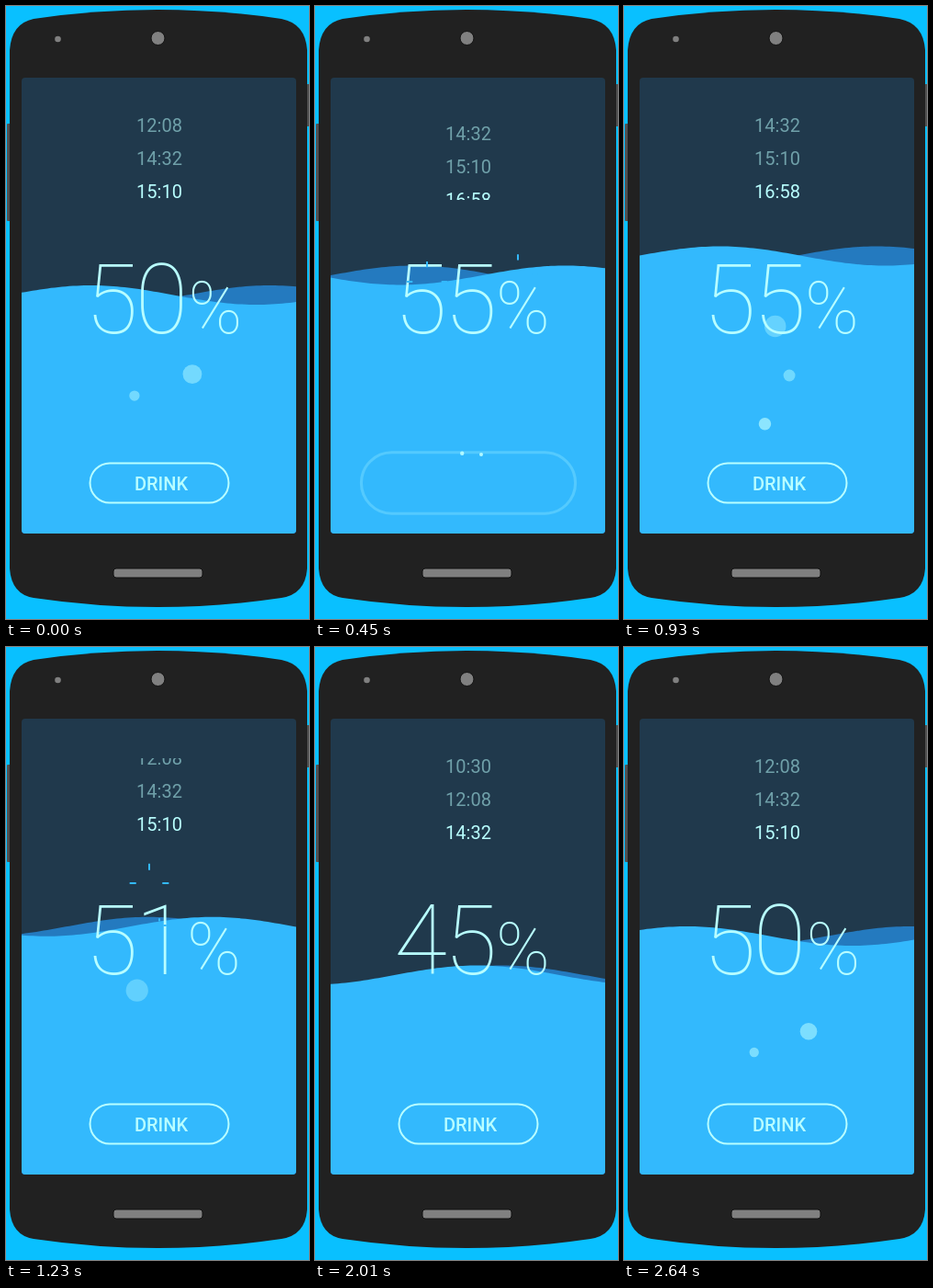
These frames come from a looping animation (330 by 667 pixels, 2670 ms). An HTML page:

```html
<!DOCTYPE html>
<html lang="en">
<head>
<meta charset="utf-8">
<title>Water tracker</title>
<style>
  html, body { margin: 0; width: 100%; height: 100%; overflow: hidden; background: #09c0ff; }
  svg { display: block; width: 330px; height: 667px; font-family: Roboto, sans-serif; }
  text { fill: #b8ffff; text-anchor: middle; }
  #times { font-size: 20px; }
  #number { font-size: 105px; font-weight: 100; }
  #number .unit { font-size: 79px; }
  #button { font-size: 20px; font-weight: 500; }
  #button rect { fill: none; stroke: #b8ffff; stroke-width: 2; }
  #rays path { fill: none; stroke: #33b9fd; stroke-width: 2; }
</style>
</head>
<body>
<svg viewBox="0 0 330 667">
  <defs>
    <clipPath id="screen"><rect x="17" y="78" width="299" height="496" rx="4"/></clipPath>
    <clipPath id="window"><rect x="17" y="121" width="299" height="90"/></clipPath>
  </defs>

  <g fill="#505050">
    <rect x="1" y="128" width="6" height="106" rx="1"/>
    <rect x="325" y="85" width="6" height="46" rx="1"/>
  </g>
  <path fill="#212121" d="M4 48Q6 19 30 14Q165-6 300 14Q326 19 328 48V612Q326 640 300 644Q165 664 30 644Q6 640 4 612Z"/>
  <g fill="#808080">
    <circle cx="56.5" cy="36" r="3.3"/>
    <circle cx="165.5" cy="35" r="7.5" stroke="#111" stroke-width="1"/>
    <rect x="117" y="612" width="97" height="10" rx="3" stroke="#111" stroke-width="1"/>
  </g>

  <g clip-path="url(#screen)">
    <rect x="17" y="78" width="299" height="496" fill="#20394c"/>
    <path id="back" fill="#247abf"/>
    <path id="front" fill="#33b9fd"/>
    <g id="bubbles" fill="#b0f8ff"></g>
    <g id="times" clip-path="url(#window)"></g>
    <g id="number">
      <text id="tens" x="115" y="356"></text>
      <text id="ones" x="169.5" y="356"></text>
      <text id="unit" class="unit" y="356">%</text>
    </g>
    <g id="rays"></g>
    <g id="button">
      <rect id="ring" x="-75.5" y="-21.5" width="151" height="43" rx="21.5"/>
      <text id="label" x="169" y="526.5">DRINK</text>
    </g>
  </g>
</svg>
<script>
const LOOP = 2670, CYCLE = 2700;
const CLICKS = [240, 2040];
const TIMES = ['10:30', '12:08', '14:32', '15:10', '16:58'];
const BUBBLES = [
  // start, end, x, linear drift, late drift, y from, y to, power, size
  [440, 1095, 160, 13.7, -17.7, 487, 257, 1.76, 15],
  [450, 1205, 181, 2.9, -16.9, 488, 303, 1.7, 9],
  [668, 1390, 154, 0, -30.5, 488, 317, 1.62, 15],
  [2250, 3000, 193, 13.3, 14.7, 487, 292, 1.6, 16],
  [2250, 2995, 149, -11.6, -15.4, 488, 300, 2.15, 8]
];
const SPLASH = 260, REACH = 22.5;

const $ = id => document.getElementById(id);
const clamp = v => Math.min(1, Math.max(0, v));
const span = (t, start, length) => clamp((t - start) / length);
const inOut = u => u < .5 ? 4 * u ** 3 : 1 - 4 * (1 - u) ** 3;
const outQuad = u => 1 - (1 - u) ** 2;
const outCubic = u => 1 - (1 - u) ** 3;

function add(parent, tag, text = '') {
  const el = document.createElementNS('http://www.w3.org/2000/svg', tag);
  el.textContent = text;
  return $(parent).appendChild(el);
}
function set(el, attrs) {
  for (const name in attrs) el.setAttribute(name, attrs[name]);
}

const items = TIMES.map(time => add('times', 'text', time));
const dots = BUBBLES.map(() => add('bubbles', 'circle'));
const rays = BUBBLES.map(() => add('rays', 'path'));
items.forEach(el => set(el, { x: 167 }));

function wave(level, crest) {
  let d = 'M17 574';
  for (let x = 17; x <= 317; x += 4) {
    const y = level - 10.5 * Math.cos((x - crest) * Math.PI / 180);
    d += `L${x} ${y.toFixed(2)}`;
  }
  return d + 'V574Z';
}

function drawBubble(i, t) {
  const [start, end, x0, drift, late, y0, y1, power, size] = BUBBLES[i];
  // bubbles that outlive the loop finish at its beginning
  const now = end > CYCLE && t < end - CYCLE + SPLASH ? t + CYCLE : t;
  const u = (now - start) / (end - start);
  const alive = u >= 0 && u < 1;
  set(dots[i], alive ? {
    cx: x0 + drift * u + late * u ** 4,
    cy: y0 + (y1 - y0) * u ** power,
    r: 2 + (size - 2) * u,
    opacity: 1 - .8 * u
  } : { r: 0 });

  const p = (now - end) / SPLASH;
  let d = '';
  if (p > 0 && p < 1) {
    const x = x0 + drift + late;
    const a = REACH * p ** .7, b = REACH * (1 - (1 - p) ** 4);
    d = `M${x} ${y1 - a}V${y1 - b}M${x - a} ${y1}H${x - b}M${x + a} ${y1}H${x + b}`;
  }
  set(rays[i], { d });
}

function drawButton(t) {
  const click = CLICKS[t < CLICKS[1] ? 0 : 1];
  const u = span(t, click, 450);
  const back = span(t, click + 450, 120);
  const scale = back > 0 ? 1 : 1 + .64 * outCubic(u);
  set($('ring'), {
    transform: `translate(167 519) scale(${scale})`,
    opacity: back > 0 ? back : (1 - u) ** 2.2
  });
  set($('label'), { opacity: back > 0 ? back : clamp(1 - u * 4) });
}

function draw(t) {
  const undo = inOut(span(t, 930, 660));
  // sum of both drinks minus the double undo
  const steps = ease => CLICKS.reduce((sum, c) => sum + ease(c), -2 * undo);

  const level = 314.5 - 42.5 * steps(c => inOut(span(t, c, 420)));
  set($('front'), { d: wave(level, 92 + .4 * t) });
  set($('back'), { d: wave(level, 288 - .4 * t) });

  const pos = 3 + steps(c => outQuad(span(t, c, 420)));
  items.forEach((el, i) => {
    const far = span(Math.abs(i - pos), .3, .4);
    set(el, { y: 208.7 + 36 * (i - pos), opacity: 1 - .48 * far });
  });

  const value = String(Math.round(50 + 5 * steps(c => span(t, c, 205))));
  $('tens').textContent = value[0];
  $('ones').textContent = value[1];
  set($('unit'), { x: value[1] === '0' ? 228 : 226.5 });

  BUBBLES.forEach((_, i) => drawBubble(i, t));
  drawButton(t);
}

const begin = performance.now();
function tick() {
  draw((performance.now() - begin) % LOOP);
  requestAnimationFrame(tick);
}
tick();
</script>
</body>
</html>
```
